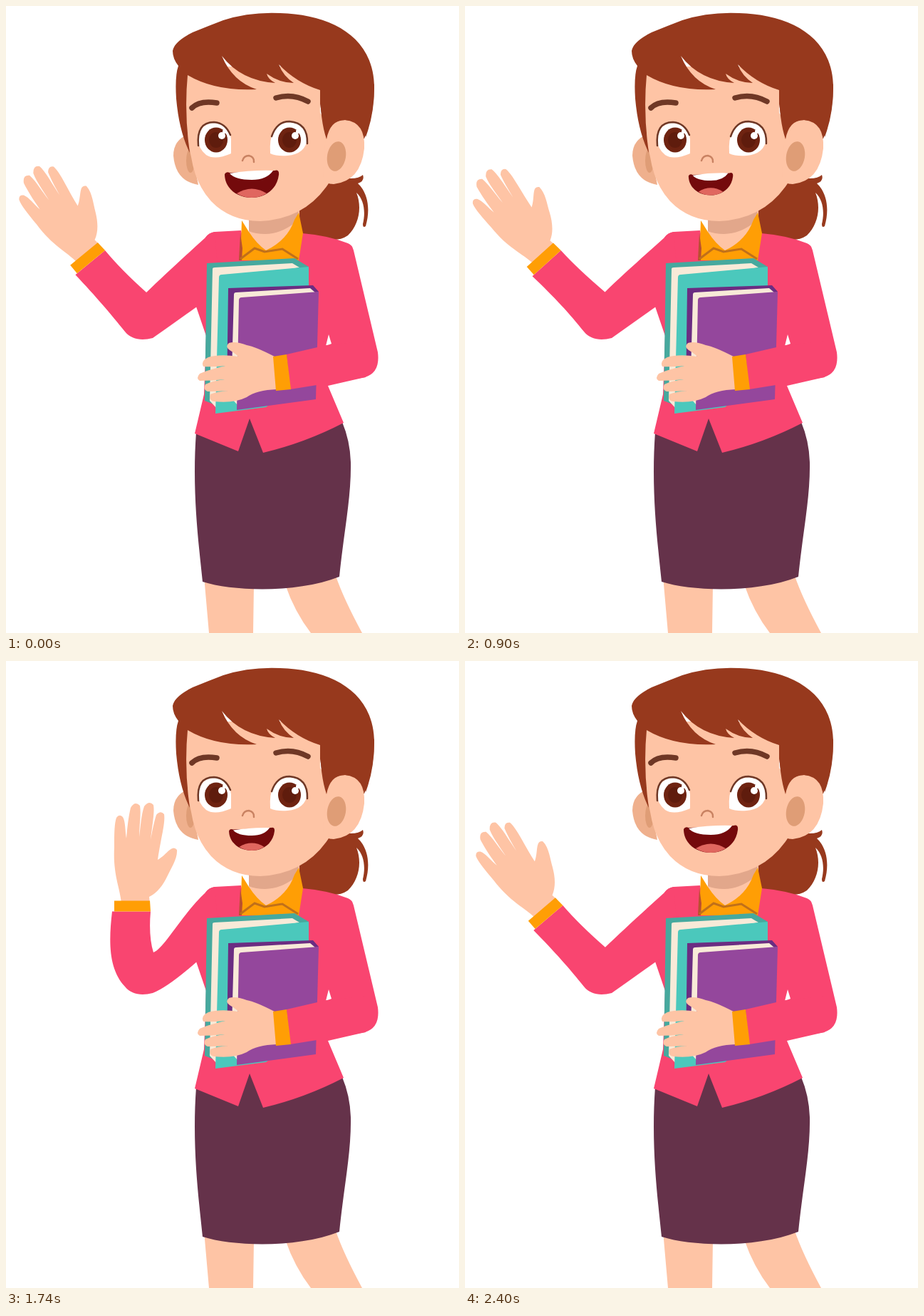
Animation of 636 by 880 pixels, one loop 2.7 s. Source, as an HTML page:

```html
<!DOCTYPE html>
<html lang="en">
<head>
<meta charset="utf-8">
<title>Waving teacher</title>
<style>
  html, body { margin: 0; width: 100%; height: 100%; overflow: hidden; background: #fff; }
  svg { display: block; width: 100vw; height: 100vh; }
  .skin { fill: #fec4a5; }
  .shade { fill: #df9d76; }
  .hair { fill: #97391d; }
  .pink { fill: #f94570; }
  .orange { fill: #ff9e05; }
  .cream { fill: #f8ead8; }
  .white { fill: #fff; }
  .iris { fill: #6e2311; }
  .pupil { fill: #5f1c0d; }
  .line { fill: none; stroke: #6f3826; stroke-linecap: round; stroke-linejoin: round; }
</style>
</head>
<body>
<svg viewBox="0 0 636 880">
  <!-- legs and skirt -->
  <path class="skin" d="M278 800L285 880H347L348 812ZM392 812Q405 850 428 880H500Q474 832 463 800Z"/>
  <path fill="#65324a" d="M267 598C261 680 270 750 276 808C320 822 410 824 468 801C474 740 485 690 484 640Q483 610 472 584L342 570Z"/>

  <!-- ponytail and neck -->
  <path class="hair" d="M440 238L484 242Q496 242 501 237Q504 246 494 249C508 262 512 285 505 309Q501 312 501 306C505 290 503 272 492 262C500 282 496 307 480 322Q466 332 440 326L405 324V280Z"/>
  <path class="skin" d="M341 285H412V345H341Z"/>
  <path fill="#e2a78b" d="M341 285H412L406 304Q385 320 364 320Q350 320 341 316Z"/>

  <!-- jacket and shirt -->
  <path class="pink" d="M280 325Q285 318 293 317L330 315L340 357H410L416 319Q452 322 480 333Q486 335 488 343L522 486Q526 517 500 522L452 533L474 585Q420 613 361 627L342 579L326 625L265 600L278 545L281 463L267 422Z"/>
  <path class="white" d="M453 461L457 474L449 477Z"/>
  <path class="orange" d="M331 301L341 317Q352 334 365 343Q395 329 405 300L411 290L417 319L411 357H329Z"/>
  <path fill="#b9502f" d="M329 319L327 357H331L332 340Z"/>
  <path fill="none" stroke="#c0701a" stroke-width="3" d="M329 355L349 340L363 345L388 341L410 355"/>

  <!-- waving arm -->
  <path id="sleeve" class="pink"/>
  <g id="hand">
    <path class="skin" transform="translate(-177 -344.5)" d="M162 340C160 318 150 300 152 262C152 245 152 228 155 220Q159 214 164 219C168 226 167 238 169 249C170 235 172 218 175 206Q181 196 188 203C190 215 187 232 187 247C189 232 190 215 194 204Q201 195 207 202C209 212 205 232 203 251C205 240 208 225 211 216Q217 209 222 215C224 228 217 250 213 279C220 275 224 270 230 265Q236 260 240 265C241 277 232 290 227 301C221 314 212 326 201 331L202 340Z"/>
    <path class="orange" d="M-25 -8H25L26 7H-25Z"/>
  </g>

  <!-- books -->
  <path fill="#46a99e" d="M282 361L405 354L425 366L300 400L294 560L279 554Z"/>
  <path class="cream" d="M290 369Q290 367 293 367L402 361L412 367L302 385L296 565L286 554Z"/>
  <path fill="#4bc8bc" d="M299 381Q299 377 303 377L425 366V520L365 563L294 572Z"/>
  <path fill="#6b2d82" d="M312 396L431 392L439 401L330 420L322 550L310 545Z"/>
  <path class="cream" d="M320 405Q320 402 323 402L427 396L434 402L330 420L325 560L316 550Z"/>
  <path fill="#94479c" d="M327 413Q327 409 331 409L439 401L435 552L324 567Z"/>

  <!-- holding arm -->
  <path class="pink" d="M394 489L450 476L505 470L505 521L399 538Z"/>
  <path class="skin" d="M377 492Q350 478 338 476Q322 470 313 473Q307 478 314 483Q324 489 326 492Q300 488 284 493Q273 498 277 506Q290 507 308 505Q286 510 272 516Q266 523 272 526Q290 526 307 524Q290 526 280 531Q276 538 283 541Q298 541 312 540Q296 541 287 545Q284 553 292 555Q320 558 338 549Q352 539 380 538Z"/>
  <path class="orange" d="M375 492L394 489L400 538L379 540Z"/>

  <!-- head -->
  <path fill="#efb08d" d="M256 180Q235 188 235 210Q238 246 270 251Z"/>
  <ellipse class="shade" cx="259" cy="217" rx="6" ry="17"/>
  <path class="hair" d="M430 60L517 110Q517 152 503 186L450 200Z"/>
  <path class="skin" d="M250 85Q250 170 260 212Q266 250 288 274Q315 302 357 302Q420 299 453 249L462 180L441 150V85Z"/>
  <path class="skin" d="M448 195Q449 160 476 160Q505 163 503 200Q498 246 460 250Q448 250 445 240Z"/>
  <ellipse class="shade" cx="464" cy="211" rx="13" ry="21" transform="rotate(10 464 211)"/>
  <path class="hair" d="M234 63Q236 50 262 37Q284 28 305 20Q342 8 385 10C455 12 517 42 517 115Q517 152 505 184Q500 160 476 160Q455 160 450 187Q441 160 441 118Q408 108 383 82Q389 98 404 108Q384 108 366 95Q368 103 378 108Q330 105 303 70Q318 106 352 117Q294 120 255 97Q250 150 258 206Q243 176 239 130Q237 98 242 84Q234 74 234 63Z"/>
  <path class="line" stroke-width="7.5" d="M261 143Q272 132 296 136M379 129Q402 122 424 134"/>

  <!-- eyes and nose -->
  <path class="white" d="M316 207Q293 217 281 209Q270 200 270 188Q272 165 292 164Q314 166 316 187ZM371 207Q368 165 398 163Q422 165 423 187Q420 208 395 210Q380 211 371 207Z"/>
  <path class="line" stroke-width="2.5" d="M270 196Q267 163 292 163Q308 164 315 181M373 183Q380 162 398 162Q424 164 423 193"/>
  <g id="iris">
    <ellipse class="iris" cx="295" cy="188" rx="16" ry="17.5"/>
    <ellipse class="pupil" cx="295" cy="188" rx="10" ry="11"/>
    <circle class="white" cx="303" cy="182" r="5"/>
    <circle class="white" cx="307" cy="176" r="3"/>
  </g>
  <use href="#iris" x="103"/>
  <path fill="none" stroke="#c98262" stroke-width="2.5" stroke-linecap="round" d="M332 217Q334 210 341 210Q349 212 348 219"/>

  <g id="mouth">
    <path fill="#740a0c" d="M307 236Q309 232 314 234Q348 233 377 231Q384 229 383 237C381 256 365 269 345 269C322 269 307 254 307 236Z"/>
    <path class="white" d="M314 235Q345 230 375 231Q366 244 345 244Q322 244 314 235Z"/>
    <path fill="#e0675f" d="M324 263Q345 250 366 263Q356 269 345 269Q334 269 324 263Z"/>
  </g>
</svg>
<script>
const LOOP = 2700, STEP = 30, LAST = 2400;
const $ = id => document.getElementById(id);

// [ms, value] keys
const wave = [[0, -39.5], [270, 0], [600, -22], [900, -42], [1080, -34.7],
  [1410, -18], [1740, 0], [2130, -21.5], [2400, -40.5]];
const smile = [[0, 1], [300, 1.04], [600, .92], [900, .82], [1410, 1.04],
  [1740, .84], [1890, .82], [2130, .87], [2400, 1]];

// Smooth curve through the keys, flat at every turning point
function sample(keys, t) {
  const slope = i => (keys[i + 1][1] - keys[i][1]) / (keys[i + 1][0] - keys[i][0]);
  const tangent = i => {
    if (i === 0 || i === keys.length - 1) return 0;
    const a = slope(i - 1), b = slope(i);
    return a * b > 0 ? 2 * a * b / (a + b) : 0;
  };
  let i = 0;
  while (i < keys.length - 2 && t >= keys[i + 1][0]) i++;
  const [t0, a] = keys[i], [t1, b] = keys[i + 1];
  const span = t1 - t0, u = (t - t0) / span, v = 1 - u;
  return a * v * v * (1 + 2 * u) + b * u * u * (3 - 2 * u)
    + span * u * v * (v * tangent(i) - u * tangent(i + 1));
}

function drawArm(deg) {
  const x = 177 + 1.58 * deg, y = 344.5 + .0061 * deg * deg;
  const rad = deg * Math.PI / 180, c = Math.cos(rad), s = Math.sin(rad);
  const at = (px, py) => `${x + px * c - py * s} ${y + px * s + py * c} `;
  const bend = 1 + deg / 40;
  const ex = 207 + .25 * deg, ey = 409 + .18 * deg;
  $('hand').setAttribute('transform', `translate(${x} ${y}) rotate(${deg})`);
  $('sleeve').setAttribute('d', `M293 317Q285 318 280 325
    C250 352 ${ex + 22 - 8 * bend} ${ey - 21 + 17 * bend} ${ex} ${ey}
    Q${at(26 - 3 * bend, 42)} ${at(26, 7)} L${at(-28, 7)}
    C${at(-25 - 8 * bend, 50)} ${147 - 3 * bend} 432 167 457
    C176 468 190 470 206 466Q${222 + 5 * bend} ${455 + 3 * bend} 268 422L300 400Z`);
}

function draw(now) {
  const t = Math.min(LAST, Math.floor(now % LOOP / STEP) * STEP);
  drawArm(sample(wave, t));
  $('mouth').setAttribute('transform',
    `translate(345 250) scale(${sample(smile, t)}) translate(-345 -250)`);
  requestAnimationFrame(() => draw(performance.now() - start));
}

const start = performance.now();
draw(0);
</script>
</body>
</html>
```
